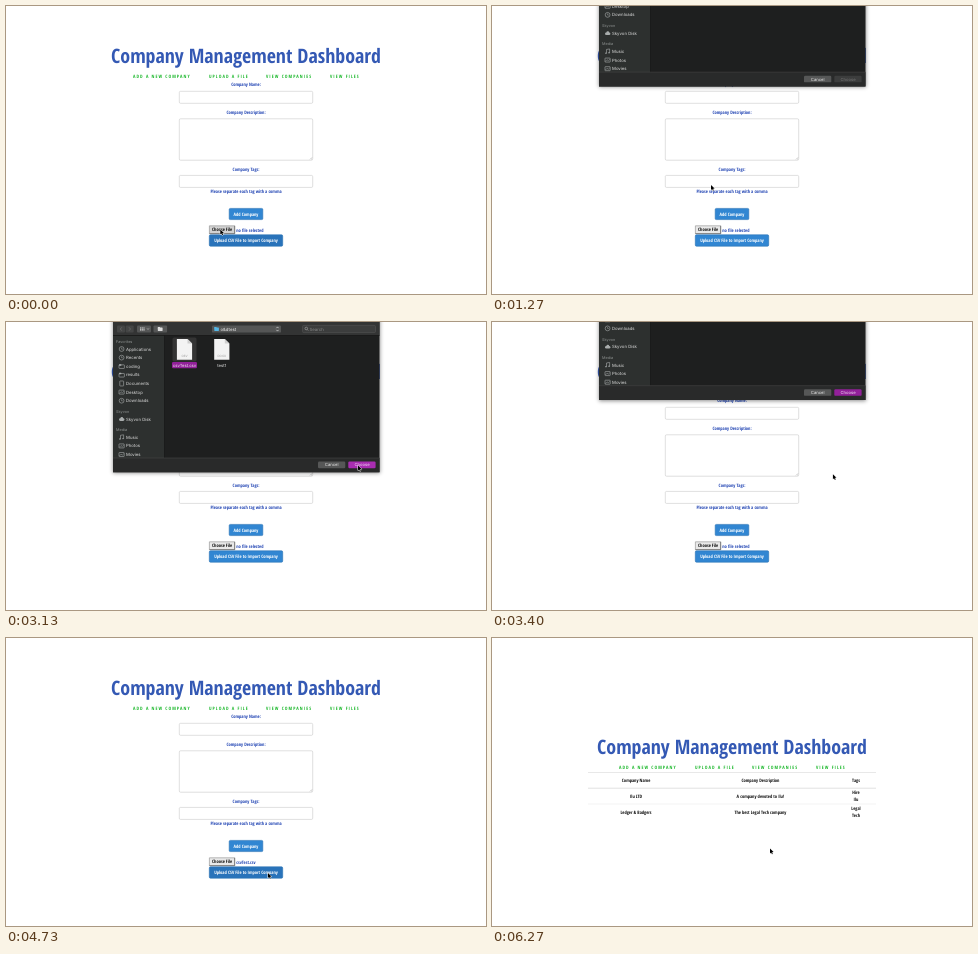
These frames come from a looping animation (480 by 288 pixels, 6.79 s). An HTML page with a canvas:

```html
<!DOCTYPE html>
<html lang="en">
<head>
<meta charset="utf-8">
<title>Company Management Dashboard</title>
<style>
  html, body { margin: 0; width: 100%; height: 100%; overflow: hidden; background: #fff; }
  canvas { display: block; width: 480px; height: 288px; }
</style>
</head>
<body>
<canvas id="stage"></canvas>
<script>
const LOOP = 6790;
const canvas = document.getElementById('stage');
const ctx = canvas.getContext('2d');
const dpr = window.devicePixelRatio || 1;
canvas.width = 480 * dpr;
canvas.height = 288 * dpr;

const TITLE = 'Company Management Dashboard';
const BLUE = '#2346b4';
const PURPLE = '#92209a';
const pageFont = size => `bold condensed ${size}px "Open Sans Condensed", "Open Sans", sans-serif`;
const uiFont = size => `${size}px Inter, sans-serif`;

// The heading spans 270px; body text follows its size.
ctx.font = pageFont(100);
const headingSize = 27000 / ctx.measureText(TITLE).width;
const bodySize = headingSize / 4.35;

const smooth = p => p * p * (3 - 2 * p);
const progress = (t, from, to) => smooth(Math.min(1, Math.max(0, (t - from) / (to - from))));

// Cursor stops: time, x, y
const cursorPath = [
  [0, 214.3, 223.5], [580, 214.3, 223.5], [940, 219, 179], [1290, 219, 179],
  [1720, 205, 39.5], [1820, 205, 39.5], [2130, 178, 29.5], [2230, 178, 29.5],
  [2880, 352, 143.5], [3230, 352, 143.5], [4000, 264, 212], [4400, 246, 238],
  [4740, 262, 235], [5040, 262, 235], [5674, 308, 106], [5740, 308, 106],
  [6270, 278, 210.5], [LOOP, 278, 210.5]
];

function cursorAt(t) {
  const i = Math.max(1, cursorPath.findIndex(k => k[0] >= t));
  const [t0, x0, y0] = cursorPath[i - 1];
  const [t1, x1, y1] = cursorPath[i];
  const p = progress(t, t0, t1);
  return { x: x0 + (x1 - x0) * p, y: y0 + (y1 - y0) * p };
}

function rect(x, y, w, h, fill, stroke, radius = 0) {
  ctx.beginPath();
  ctx.roundRect(x, y, w, h, radius);
  if (fill) { ctx.fillStyle = fill; ctx.fill(); }
  if (stroke) { ctx.strokeStyle = stroke; ctx.lineWidth = 0.6; ctx.stroke(); }
}

function path(points, color, width) {
  ctx.beginPath();
  points.forEach(([x, y]) => ctx.lineTo(x, y));
  if (width) { ctx.strokeStyle = color; ctx.lineWidth = width; ctx.stroke(); }
  else { ctx.fillStyle = color; ctx.fill(); }
}

// y is the middle of the capital letters
function text(s, x, y, color, size, { align = 'center', font = pageFont, spacing = 0 } = {}) {
  ctx.font = font(size);
  ctx.textAlign = align;
  ctx.letterSpacing = spacing + 'px';
  ctx.fillStyle = color;
  ctx.fillText(s, x, y + size * 0.36);
}
const body = (s, x, y, color = BLUE, align = 'center') => text(s, x, y, color, bodySize, { align });
const ui = (s, x, y, color = '#dedede', size = 4.3, align = 'left') =>
  text(s, x, y, color, size, { align, font: uiFont });

function drawHeader(top) {
  text(TITLE, 240, top + 50.2, '#3459b4', headingSize);
  const links = { 'ADD A NEW COMPANY': 127, 'UPLOAD A FILE': 203, 'VIEW COMPANIES': 260, 'VIEW FILES': 324 };
  for (const [label, x] of Object.entries(links)) {
    text(label, x, top + 70.6, '#1cb82c', bodySize, { align: 'left', spacing: 1.05 });
  }
}

function button(label, x, y, w, h, fill) {
  rect(x, y, w, h, fill, '#2a72b4', 1.2);
  body(label, x + w / 2, y + h / 2, '#fff');
}

function drawForm(t, cursor) {
  drawHeader(0);
  body('Company Name:', 240, 78.6);
  body('Company Description:', 240, 106.3);
  body('Company Tags:', 240, 163.2);
  body('Please separate each tag with a comma', 240, 185.6);
  for (const [y, h] of [[85.3, 12], [112.8, 41.4], [169.4, 12]]) {
    rect(173.3, y, 133.4, h, '#fff', '#c9c9c9', 1.2);
  }
  path([[304, 153.4], [306, 151.4]], '#888', 0.4);
  path([[305.2, 153.4], [306, 152.6]], '#888', 0.4);

  button('Add Company', 223.2, 202.4, 33.6, 11.2, '#3186d2');
  rect(203.4, 219.8, 25.2, 7.8, t < 70 ? '#d2d2d2' : '#e9e9e9', '#8a8a8a');
  path([[203.4, 227.7], [228.7, 227.7], [228.7, 219.8]], '#555', 0.6);
  body('Choose File', 216, 223.8, '#111');
  body(t < 3600 ? 'no file selected' : 'csvTest.csv', 230.3, 223.9, BLUE, 'left');
  const over = t > 4000 && cursor.y > 229;
  button('Upload CSV File to Import Company', 203.3, 228.8, 73.4, 11.4, t < 70 || over ? '#2973ba' : '#3186d2');
}

function drawList(hoverY) {
  drawHeader(59);
  const rows = [
    ['Ilu LTD', 'A company devoted to Ilu!', 'Hire', 'Ilu'],
    ['Ledger & Badgers', 'The best Legal Tech company', 'Legal', 'Tech']
  ];
  const line = (y, color) => path([[96, y], [384, y]], color, 0.7);
  rows.forEach(([name, description, tag1, tag2], i) => {
    const top = 150.2 + i * 15.8;
    if (hoverY >= top && hoverY < top + 15.8) rect(96, top, 288, 15.8, '#e7e7e7');
    body(name, 144, top + 7.9, '#111');
    body(description, 268.4, top + 7.9, '#111');
    body(tag1, 364, top + 4, '#111');
    body(tag2, 364, top + 11.3, '#111');
  });
  body('Company Name', 144, 142.2, '#111');
  body('Company Description', 268.4, 142.2, '#111');
  body('Tags', 364, 142.2, '#111');
  line(134.5, '#dedede');
  line(150.2, '#d4d4d4');
  line(166, '#eeeeee');
}

function sidebarIcon(kind, y) {
  const c = '#a9adad';
  if (kind === 'folder') {
    rect(113, y - 2, 2.4, 1.5, c, null, 0.4);
    rect(113, y - 1.4, 5.4, 3.6, null, c, 0.5);
  } else if (kind === 'round') {
    rect(113.2, y - 2.4, 4.8, 4.8, null, c, 2.4);
    path([[115.6, y - 1.4], [115.6, y + 0.2], [116.8, y + 0.2]], c, 0.5);
  } else if (kind === 'page') {
    rect(113.8, y - 2.5, 3.8, 5, null, c, 0.4);
  } else if (kind === 'note') {
    path([[114.5, y + 1.8], [114.5, y - 2], [117.6, y - 2.5], [117.6, y + 1.3]], c, 0.6);
    rect(113.2, y + 1, 1.5, 1.4, c, null, 0.7);
    rect(116.3, y + 0.6, 1.5, 1.4, c, null, 0.7);
  } else if (kind === 'disk') {
    rect(113, y - 0.8, 5.4, 2.6, c, null, 1.3);
    rect(114.4, y - 2, 2.8, 3, c, null, 1.4);
  } else {
    rect(113, y - 2, 5.2, 4, null, c, 0.4);
    path([[113.4, y + 1.4], [115, y - 0.4], [116.2, y + 0.6], [117.8, y - 0.8]], c, 0.5);
  }
}

const sidebar = [
  ['Favorites', 19.5, [['Applications', 'round'], ['Recents', 'round'], ['coding', 'folder'],
    ['results', 'folder'], ['Documents', 'page'], ['Desktop', 'screen'], ['Downloads', 'round']]],
  ['Skyvon', 89.6, [['Skyvon Disk', 'disk']]],
  ['Media', 107.8, [['Music', 'note'], ['Photos', 'screen'], ['Movies', 'screen']]]
];

function drawFile(label, tag, x, selected) {
  if (selected) {
    rect(x - 12, 15.5, 24, 24, '#343434', null, 1.5);
    rect(x - 12.5, 40, 25, 6.2, PURPLE, null, 1.2);
  }
  path([[x - 7.6, 17], [x + 3, 17], [x + 7.6, 21.6], [x + 7.6, 37.8], [x - 7.6, 37.8]], '#f3f3f3');
  path([[x + 3, 17], [x + 3, 21.6], [x + 7.6, 21.6]], '#cfcfcf');
  ui(tag, x, 34.4, '#9a9a9a', 3, 'center');
  ui(label, x, 43.1, '#ececec', 4.2, 'center');
}

function drawDialog(t, shown) {
  ctx.save();
  ctx.translate(0, (shown - 1) * 150.5);
  ctx.save();
  ctx.shadowColor = 'rgba(0,0,0,.45)';
  ctx.shadowBlur = 4 * dpr;
  ctx.shadowOffsetY = dpr;
  rect(107, -10, 266.5, 160.3, '#1e1f1f');
  ctx.restore();

  rect(107, -10, 266.5, 23.5, '#333434');
  rect(107, 13.5, 51.5, 122.5, '#2d302f');
  rect(107, 136, 266.5, 14.3, '#292a2a');
  path([[107, 13.5], [373.5, 13.5]], '#111', 0.6);
  path([[158.5, 13.5], [158.5, 136]], '#101010', 0.5);
  path([[107, 136], [373.5, 136]], '#454545', 0.6);

  rect(111, 3.4, 8, 7.2, '#444545', null, 1);
  rect(119.7, 3.4, 8, 7.2, '#444545', null, 1);
  path([[115.8, 5.3], [114.3, 7], [115.8, 8.7]], '#777', 0.6);
  path([[123, 5.3], [124.5, 7], [123, 8.7]], '#777', 0.6);
  rect(131, 3.4, 14, 7.2, '#555656', null, 1);
  for (let i = 0; i < 6; i++) rect(134 + (i % 3) * 1.7, 5.4 + (i > 2) * 1.8, 1.2, 1.2, '#ddd');
  path([[141, 6.3], [142, 7.5], [143, 6.3]], '#ddd', 0.5);
  rect(147.5, 3.4, 13.6, 7.2, '#555656', null, 1);
  rect(151.8, 5, 2.2, 1.5, '#ddd');
  rect(151.8, 5.6, 4.8, 3.3, '#ddd', null, 0.4);

  rect(206, 3.4, 69, 7.2, '#555656', null, 1.2);
  rect(208.3, 5, 2.2, 1.5, '#55b6e4');
  rect(208.3, 5.6, 4.6, 3.3, '#55b6e4', null, 0.4);
  ui('o&dtest', 214.5, 7, '#f0f0f0');
  path([[270.4, 6.2], [271.5, 4.9], [272.6, 6.2]], '#eee', 0.6);
  path([[270.4, 7.8], [271.5, 9.1], [272.6, 7.8]], '#eee', 0.6);
  rect(296.5, 3.4, 73, 7.2, '#3c3d3d', '#555', 1.2);
  rect(299, 5.2, 2.6, 2.6, null, '#aaa', 1.3);
  path([[301.3, 7.5], [302.3, 8.6]], '#aaa', 0.6);
  ui('Search', 303.5, 7, '#888');

  for (const [heading, y, items] of sidebar) {
    ui(heading, 110, y, '#8f9392', 3.8);
    items.forEach(([label, icon], i) => {
      const rowY = y + 7.5 + i * 8.62;
      sidebarIcon(icon, rowY);
      ui(label, 120, rowY);
    });
  }

  const selected = t >= 2070;
  drawFile('csvTest.csv', 'CSV', 178.5, selected);
  drawFile('test1', 'DOCX', 215.8, false);
  rect(312, 139.6, 27.3, 6.6, '#565757', null, 1.2);
  ui('Cancel', 325.7, 142.9, '#eee', 4.2, 'center');
  const pressed = t >= 3070 && t < 3200;
  rect(342.3, 139.6, 27.3, 6.6, selected ? (pressed ? '#a92db2' : PURPLE) : '#3c3d3d', null, 1.2);
  ui('Choose', 356, 142.9, selected ? '#f4e6f5' : '#777', 4.2, 'center');
  ctx.restore();
}

function drawCursor({ x, y }) {
  const arrow = [[0, 0], [0, 5], [1.15, 4], [1.95, 5.8], [2.8, 5.4], [2.05, 3.7], [3.6, 3.6], [0, 0]]
    .map(([dx, dy]) => [x + dx, y + dy]);
  path(arrow, '#fff', 0.9);
  path(arrow, '#000');
}

function draw(t) {
  ctx.setTransform(dpr, 0, 0, dpr, 0, 0);
  ctx.textRendering = 'geometricPrecision';
  rect(0, 0, 480, 288, '#fff');
  const cursor = cursorAt(t);
  if (t < 5070) drawForm(t, cursor);
  else drawList(cursorAt(t - 45).y);
  const shown = progress(t, 1085, 1440) - progress(t, 3250, 3560);
  if (shown > 0) drawDialog(t, shown);
  drawCursor(cursor);
}

const start = performance.now();
function tick() {
  draw((performance.now() - start) % LOOP);
  requestAnimationFrame(tick);
}
tick();
</script>
</body>
</html>
```
